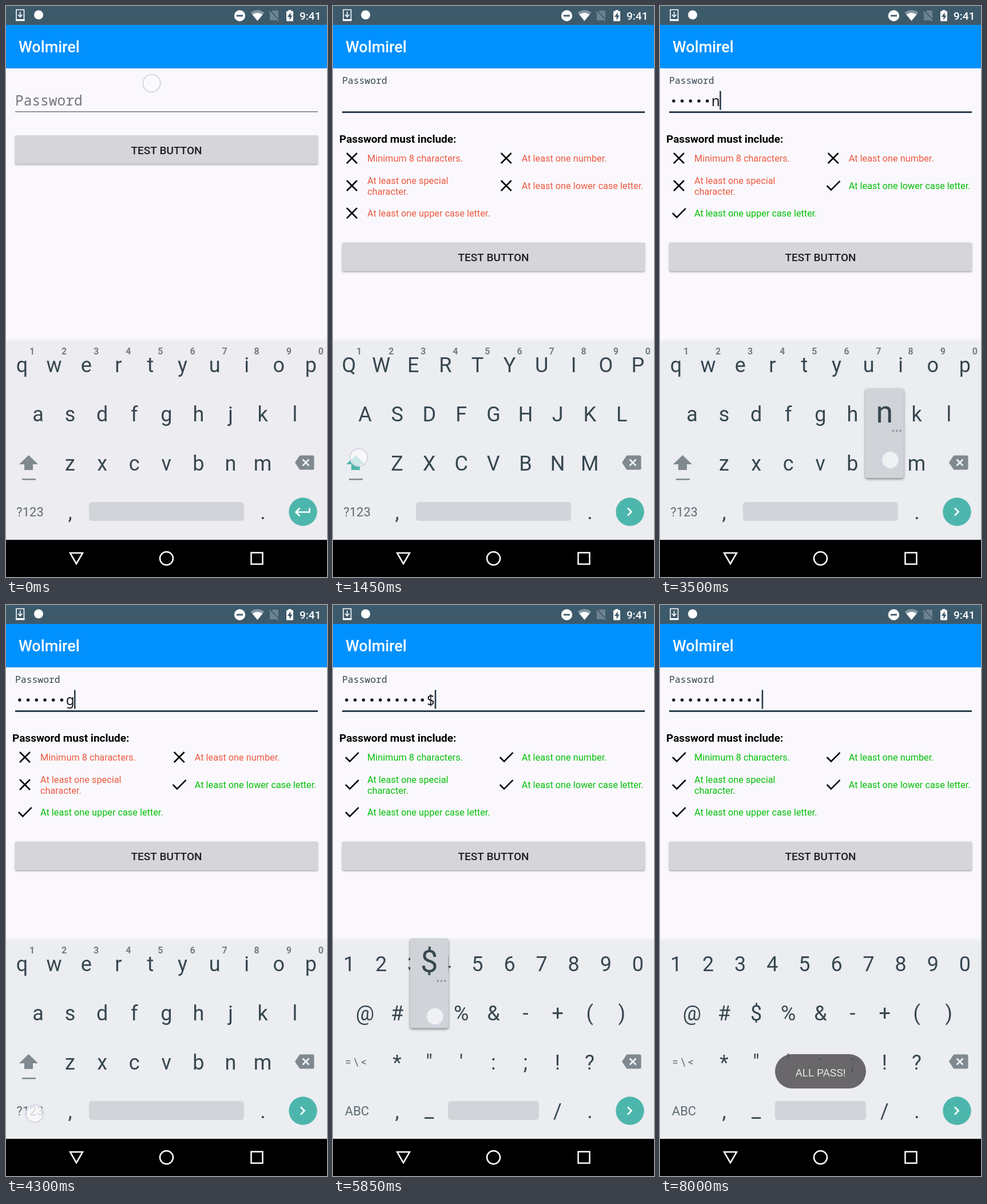
Animation of 561x998 px, one loop 8.05 s. Source, as an HTML page with a canvas:

```html
<!DOCTYPE html>
<html lang="en">
<head>
<meta charset="utf-8">
<title>Password check</title>
<style>
html, body { margin: 0; width: 100%; height: 100%; overflow: hidden; background: #000; }
canvas { display: block; }
</style>
</head>
<body>
<canvas id="stage" width="561" height="998"></canvas>
<script>
const ctx = document.getElementById('stage').getContext('2d');
const LOOP = 8050, FOCUS = 590, UPPER = 1440, SYMBOLS = 4350;
const SANS = 'Roboto, sans-serif', MONO = '"Noto Sans Mono", monospace';
const INK = '#37474f', GREY = '#7f898f', TEAL = '#4db6ac', ACCENT = '#263a4a';
const PITCH = 56.1, ROW_X = [28, 56, 112], ROW_Y = [627, 713, 798.5];
const LETTERS = ['qwertyuiop', 'asdfghjkl', 'zxcvbnm'];
const SIGNS = ['1234567890', '@#$%&-+()', '*"\':;!?'];
const TYPE_LAG = 95;

// key, time of press, touch offset from the key centre
const presses = [
  ['T', 1780, 12, 13], ['e', 2030, 14, 12], ['s', 2310, 21, 2], ['t', 2630, 12, 13],
  ['i', 3070, 12, 13], ['n', 3400, 10, -5], ['g', 3780, 12, 6],
  ['1', 4680, 4, 26], ['2', 4900, 8, 26], ['3', 5190, 8, 26], ['$', 5720, 10, 6]
].map(([key, down, dx, dy]) => {
  const rows = down < SYMBOLS ? LETTERS : SIGNS;
  const row = rows.findIndex(r => r.includes(key.toLowerCase()));
  const x = ROW_X[row] + PITCH * rows[row].indexOf(key.toLowerCase()), y = ROW_Y[row];
  return { key, down, x, y, tx: x + dx, ty: y + dy };
});
const touches = [{ down: -95, tx: 254.5, ty: 135 }, { down: 1370, tx: 45, ty: 789 },
  { down: 4220, tx: 50, ty: 889 }, ...presses];

const rules = [
  [33, 266, /.{8}/, ['Minimum 8 characters.']],
  [302.7, 266, /\d/, ['At least one number.']],
  [33, 314, /[^a-z0-9]/i, ['At least one special', 'character.']],
  [302.7, 314, /[a-z]/, ['At least one lower case letter.']],
  [33, 362, /[A-Z]/, ['At least one upper case letter.']]
];

const clamp = v => Math.max(0, Math.min(1, v));
const ease = v => (v = clamp(v), v * v * (3 - 2 * v));
const mix = (a, b, p) => a + (b - a) * p;

function rect(x, y, w, h, color, r = 0) {
  ctx.fillStyle = color;
  ctx.beginPath();
  ctx.roundRect(x, y, w, h, r);
  ctx.fill();
}
function disc(x, y, r, color) {
  ctx.fillStyle = color;
  ctx.beginPath();
  ctx.arc(x, y, r, 0, 7);
  ctx.fill();
}
function fillPath(d, color) {
  ctx.fillStyle = color;
  ctx.fill(new Path2D(d));
}
function line(d, color, width) {
  ctx.strokeStyle = color;
  ctx.lineWidth = width;
  ctx.stroke(new Path2D(d));
}
function text(s, x, y, size, color, { weight = 400, align = 'left', family = SANS } = {}) {
  ctx.font = `${weight} ${size}px ${family}`;
  ctx.textAlign = align;
  ctx.fillStyle = color;
  ctx.fillText(s, x, y);
}
function shadowed(blur, dy, alpha, draw) {
  ctx.save();
  ctx.shadowColor = `rgba(0,0,0,${alpha})`;
  ctx.shadowBlur = blur;
  ctx.shadowOffsetY = dy;
  draw();
  ctx.restore();
}
const mid = { align: 'center' };

function statusBar() {
  rect(0, 0, 561, 33, '#3d5a6b');
  line('M18 6.5H31.5V25.5H18Z', '#fff', 1.6);
  line('M17 24.5H32.5', '#fff', 3);
  line('M24.7 10V18M21 15L24.7 19L28.5 15', '#fff', 1.6);
  disc(57, 15.5, 8, '#fff');
  disc(408.5, 17, 9.7, '#fff');
  rect(403, 15.6, 11, 2.8, '#3d5a6b');
  fillPath('M427.5 11.5Q439.5 3 451.5 11.5L439.5 26Z', '#8497a2');
  fillPath('M430.5 15Q439.5 9 448.5 15L439.5 26Z', '#fff');
  fillPath('M466 8H476V25H461V13Z', '#6d828f');
  line('M460 8L477 26', '#3d5a6b', 3.5);
  line('M460 9.5L476 26', '#8497a2', 1.6);
  rect(493.5, 7, 5, 3, '#fff');
  rect(490, 9, 12, 17.5, '#fff', 1);
  fillPath('M497.5 11L492 19H495.5V25L500.5 16.5H497.5Z', '#3d5a6b');
  text('9:41', 513, 23.5, 19, '#fff', { weight: 500 });
}

function field(t, typed, last) {
  const p = ease((t - 560) / 220), on = t >= FOCUS;
  text('Password', 16, mix(173.5, 135.5, p), mix(24.5, 16.4, p), on ? '#33444f' : '#777478', { family: MONO });
  rect(16, 184, 529, 1.6, '#78757b');
  if (on) {
    const grow = ease((t - FOCUS) / 220);
    const left = mix(254, 16, grow);
    rect(left, 184.2, mix(254, 545, grow) - left, 2.7, ACCENT);
  }
  const age = t - last;
  [...typed].forEach((c, i) => {
    const x = 16.5 + 14.7 * i;
    if (i < typed.length - 1 || age >= 1500) disc(x + 7.4, 166, 2.8, '#1c1c1e');
    else text(c, x, 174.5, 24.5, '#1c1c1e', { family: MONO });
  });
  if (on && (age + 25) % 1010 < 505) rect(16 + 14.7 * typed.length, 148.5, 2.6, 33, ACCENT);
}

function checklist(t, typed) {
  const p = ease((t - 640) / 360), top = 226 + 187.5 * p;
  ctx.save();
  ctx.beginPath();
  ctx.rect(0, 190, 561, top - 190);
  ctx.clip();
  ctx.globalAlpha = p;
  text('Password must include:', 11, 238.5, 19, '#000', { weight: 700 });
  for (const [x, y, test, lines] of rules) {
    const ok = test.test(typed);
    line(ok ? `M${x - 11} ${y}l7.3 7.3l15.5 -15.5` : `M${x - 9} ${y - 9}l18 18m0 -18l-18 18`, '#000', 2.6);
    lines.forEach((s, i) => text(s, x + 27, y + 6 + (i - (lines.length - 1) / 2) * 19, 16.3, ok ? '#06c00a' : '#ee5a41'));
  }
  ctx.restore();
  shadowed(3, 1.5, .35, () => rect(16, top, 529, 50, '#d6d5d9', 2));
  text('TEST BUTTON', 280.5, top + 32.5, 19, '#1f1f20', { weight: 500, ...mid });
}

function keyboard(t, upper) {
  const signs = t >= SYMBOLS;
  rect(0, 582, 561, 4, '#f3f2f6');
  rect(0, 586, 561, 347, t < 50 ? '#edecf1' : '#ebedf1');
  (signs ? SIGNS : LETTERS).forEach((keys, r) => [...keys].forEach((k, i) => {
    const x = ROW_X[r] + PITCH * i;
    text(upper ? k.toUpperCase() : k, x, ROW_Y[r] + 13, 36, INK, mid);
    if (!signs && r === 0) text((i + 1) % 10, x + 17.5, 609, 16, '#747d82', { weight: 700, ...mid });
  }));
  if (signs) {
    text('= \\ <', 40, 804.5, 19, '#5d6b72', mid);
    text('_', 168, 895, 36, INK, mid);
    text('/', 392.5, 897, 36, INK, mid);
    rect(201, 867, 159, 33, '#d1d5d9', 5);
  } else {
    fillPath('M39.5 785L56 801H47V811H32V801H23Z', upper ? TEAL : GREY);
    rect(28, 826, 24, 2.6, GREY);
    rect(145, 867, 271, 33, '#d1d5d9', 5);
  }
  text(signs ? 'ABC' : '?123', 42, 891.5, 22, '#5d6b72', mid);
  text(',', 112, 897, 36, INK, mid);
  text('.', 449, 897, 36, INK, mid);
  fillPath('M505 798L513 786Q513.500 785.500 515 785.500H536Q538.500 785.500 538.500 788V808Q538.500 810.500 536 810.500H515Q513.500 810.500 513 810Z', GREY);
  line('M518.500 792.500l11 11m0 -11l-11 11', '#eff1f4', 2.8);
  disc(519, 884, 24.7, TEAL);
  line(t < FOCUS ? 'M530.500 877.500V884.500H507M513.500 877.500L506.500 884.500L513.500 891.500' : 'M515 877.500L521.500 884L515 890.500', '#fff', 2.7);
}

function popup({ key, x, y }) {
  const left = Math.max(4, x - 33.5), top = y - 130;
  shadowed(4, 2, .45, () => rect(left, top, 67, 156.5, '#d0d4d8', 4));
  text(key, left + 33.5, top + 59, 54, INK, mid);
  for (let i = 0; i < 3; i++) disc(left + 48.5 + 6.3 * i, top + 74, 1.9, '#91999e');
}

function touch({ tx, ty }, age) {
  ctx.globalAlpha = 1 - clamp((age - 130) / 105);
  disc(tx, ty, 16, 'rgba(252,252,254,.72)');
  line(`M${tx - 15.2} ${ty}a15.2 15.2 0 1 0 30.4 0a15.2 15.2 0 1 0 -30.4 0`, 'rgba(205,206,224,.8)', 2);
  ctx.globalAlpha = 1;
}

function toast(t) {
  const alpha = t < 7800 ? .94 * clamp((t - 5950) / 380) : mix(.94, .885, (t - 7800) / 200);
  if (alpha <= 0) return;
  ctx.globalAlpha = alpha;
  rect(201, 785, 159, 60, '#59565a', 30);
  text('ALL PASS!', 280.5, 823.5, 19, '#f4f4f4', mid);
  ctx.globalAlpha = 1;
}

function navBar() {
  rect(0, 933, 561, 65, '#000');
  line('M112 956H134L123 975Z', '#fff', 2.5);
  line('M269 965.500a11.500 11.500 0 1 0 23 0a11.500 11.500 0 1 0 -23 0', '#fff', 2.5);
  line('M428.500 955.500H448.500V975.500H428.500Z', '#fff', 2.5);
}

function draw(now) {
  const t = now % LOOP;
  const done = presses.filter(p => t >= p.down + TYPE_LAG);
  const typed = done.map(p => p.key).join('');
  const last = done.length ? done[done.length - 1].down + TYPE_LAG : FOCUS;
  rect(0, 0, 561, 998, '#faf8fd');
  statusBar();
  rect(0, 33, 561, 76, '#0091ff');
  text('Wolmirel', 22, 81, 27, '#fff', { weight: 500 });
  field(t, typed, last);
  checklist(t, typed);
  keyboard(t, t >= UPPER && !typed);
  for (const p of presses) if (t >= p.down + 40 && t < p.down + 140) popup(p);
  toast(t);
  navBar();
  for (const p of touches) {
    const age = t - p.down;
    if (age >= 30 && age < 235) touch(p, age);
  }
}

let start;
function tick(now) {
  start ??= now;
  draw(now - start);
  requestAnimationFrame(tick);
}
draw(0);
requestAnimationFrame(tick);
</script>
</body>
</html>
```
